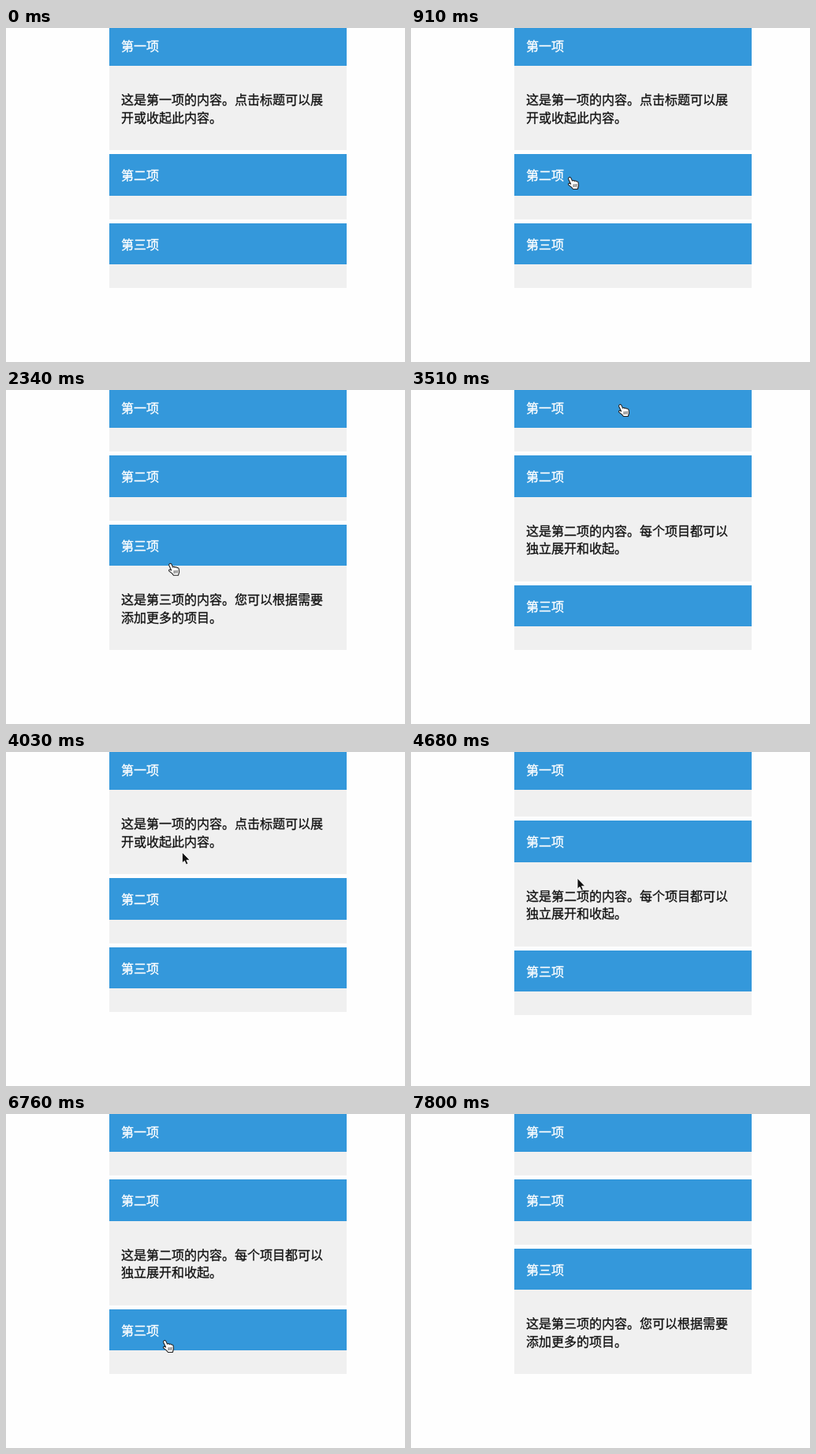
Animation, 506 px wide and 424 px high, one loop 7.93 s. Source, as an HTML page:

```html
<!DOCTYPE html>
<html lang="zh-CN">
<head>
<meta charset="utf-8">
<title>折叠面板</title>
<style>
  html, body { margin: 0; width: 100%; height: 100%; overflow: hidden; background: #fefefe; }
  body { position: relative; font: 16px/22.5px "Noto Sans CJK SC", "Noto Sans CJK", sans-serif; }
  .accordion {
    position: absolute; left: 131px; top: -4.5px; width: 301px;
    -webkit-text-stroke: .3px; filter: blur(.35px);
  }
  .item { margin-bottom: 5px; }
  .head { padding: 15px; background: #3498db; color: #fff; }
  .body { padding: 15px; max-height: 0; overflow: hidden; background: #f0f0f0; color: #111; }
  .body p { margin: 16px 0; }
  #cursor { position: absolute; left: 0; top: 0; overflow: visible; }
  #cursor path { stroke-linejoin: round; stroke-linecap: round; }
</style>
</head>
<body>
<div class="accordion">
  <div class="item">
    <div class="head">第一项</div>
    <div class="body"><p>这是第一项的内容。点击标题可以展开或收起此内容。</p></div>
  </div>
  <div class="item">
    <div class="head">第二项</div>
    <div class="body"><p>这是第二项的内容。每个项目都可以独立展开和收起。</p></div>
  </div>
  <div class="item">
    <div class="head">第三项</div>
    <div class="body"><p>这是第三项的内容。您可以根据需要添加更多的项目。</p></div>
  </div>
</div>
<svg id="cursor" width="20" height="20">
  <g id="hand" transform="translate(-1.5 -1.5)" stroke="#222" fill="none">
    <path fill="#fff" stroke-width="1.1" d="M2 1.2C3.2.4 4.2 1.3 4.7 2.6L6 5.6C7 4.7 8.2 5 8.7 5.9 9.6 5.1 10.8 5.5 11.2 6.4 12.4 5.9 13.5 6.8 13.7 8.2L14 12 12.8 16H7L5 13.6 1.2 10.6C.4 9.2 1.8 8.2 3 8.9L4.1 9.6 1.2 3.4C.8 2.4 1.2 1.6 2 1.2Z"/>
    <path stroke-width=".8" d="M7.6 10.2v3M9.6 10v3M11.6 9.8v3"/>
  </g>
  <path id="arrow" fill="#111" stroke="#fff" stroke-width=".8" d="M0 0V13.2L3 10.6 5 15.2 7.4 14.2 5.4 9.7H9.4Z"/>
</svg>
<script>
const LOOP = 7930, STEP = 130;
const SHOW = 130, HIDE = 7540;
const EXPAND = 200, REST = 150, TRAVEL = 400;
const MAX = 200, FULL = 77;
const HEAD = 52.5, PAD = 30, GAP = 5, TOP = -4.5;

// The pointer rests at each stop, clicks there, then travels to the next one.
const stop = (time, item, x, y) => ({ time, item, x, y });
const stops = [
  stop(SHOW - REST, 0, 119, 282),
  stop(1288, 1, 200, 190),
  stop(2044, 2, 205, 268),
  stop(2956, 1, 212, 112),
  stop(3606, 0, 264, 19),
  stop(4517, 1, 211, 161),
  stop(5164, 0, 222, 14),
  stop(5814, 1, 216, 190),
  stop(7246, 2, 200, 288)
];

const bodies = [...document.querySelectorAll('.body')];
const [cursor, hand, arrow] = ['cursor', 'hand', 'arrow'].map(id => document.getElementById(id));
const show = (el, on) => { el.style.display = on ? '' : 'none'; };

// CSS "ease": cubic-bezier(.25, .1, .25, 1)
function ease(x) {
  if (x >= 1) return 1;
  let lo = 0, hi = 1, s;
  for (let i = 0; i < 24; i++) {
    s = (lo + hi) / 2;
    if (.75 * s * (1 - s) + s ** 3 < x) lo = s; else hi = s;
  }
  return .3 * s * (1 - s) ** 2 + 3 * s * s * (1 - s) + s ** 3;
}

function heights(t) {
  const h = [MAX, 0, 0];
  let open = 0;
  for (const { time, item } of stops.slice(1)) {
    if (t < time) break;
    const e = ease((t - time) / EXPAND);
    h[open] = MAX * (1 - e);
    h[item] = MAX * e;
    open = item;
  }
  return h;
}

function overHead(x, y, h) {
  if (x < 131 || x > 432) return false;
  let top = TOP;
  return h.some(v => {
    const hit = y >= top && y < top + HEAD;
    top += HEAD + PAD + Math.min(FULL, v) + GAP;
    return hit;
  });
}

function pointer(t) {
  const i = stops.findLastIndex(s => t >= s.time + REST);
  const a = stops[i], b = stops[i + 1] || a;
  const u = Math.min(1, (t - a.time - REST) / TRAVEL), k = u * u * (3 - 2 * u);
  return { x: a.x + (b.x - a.x) * k, y: a.y + (b.y - a.y) * k, resting: u === 1 };
}

function draw(t) {
  const h = heights(t);
  h.forEach((v, i) => { bodies[i].style.maxHeight = v + 'px'; });
  const visible = t >= SHOW && t < HIDE;
  show(cursor, visible);
  if (!visible) return;
  const { x, y, resting } = pointer(t);
  cursor.style.transform = `translate(${x}px, ${y}px)`;
  // a resting pointer keeps its hand while the layout slides away
  const over = resting || overHead(x, y, h);
  show(hand, over);
  show(arrow, !over);
}

const begin = performance.now();
function tick() {
  const t = (performance.now() - begin) % LOOP;
  draw(Math.floor(t / STEP) * STEP);
  requestAnimationFrame(tick);
}
tick();
</script>
</body>
</html>
```
